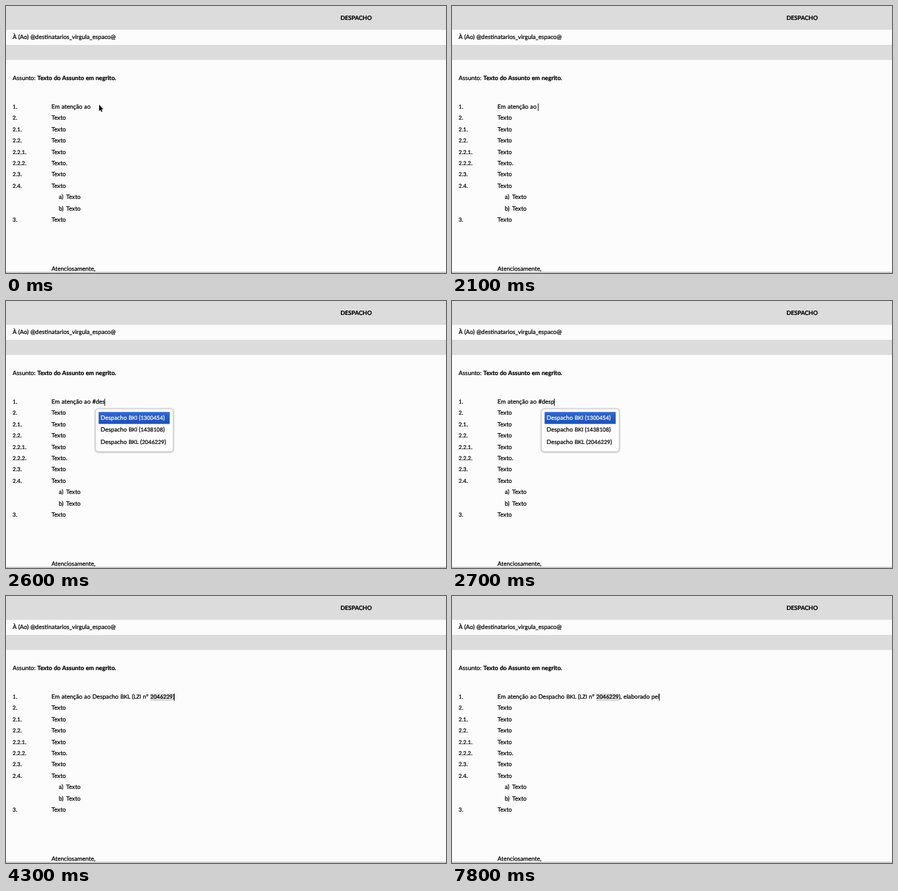
These frames come from a looping animation (600 by 364 pixels, 8000 ms). An HTML page with a canvas:

```html
<!DOCTYPE html>
<html lang="pt-BR">
<head>
<meta charset="utf-8">
<title>Despacho</title>
<style>
html, body { margin: 0; width: 100%; height: 100%; overflow: hidden; background: #fcfcfc; }
canvas { display: block; width: 600px; height: 364px; }
</style>
</head>
<body>
<canvas id="stage"></canvas>
<script>
const W = 600, H = 364, LOOP = 8000;
const canvas = document.getElementById('stage');
const ctx = canvas.getContext('2d');
const dpr = window.devicePixelRatio || 1;
canvas.width = W * dpr;
canvas.height = H * dpr;

const BODY = 8.2, CAPS = 7.55;
const LEFT = 9, INDENT = 62, FIRST = 140, LEADING = 15.4;
const OPENING = 'Em atenção ao';
const NUMBER = '2046229';
const CITED = OPENING + ' Despacho BKL (LZI nº ';

const rows = [
  ['1.', ''], ['2.', 'Texto'], ['2.1.', 'Texto'], ['2.2.', 'Texto'],
  ['2.2.1.', 'Texto'], ['2.2.2.', 'Texto.'], ['2.3.', 'Texto'], ['2.4.', 'Texto'],
  ['a)', 'Texto', 10], ['b)', 'Texto', 10], ['3.', 'Texto']
];

const allItems = [
  'Data de Autuação: 30/10/2018',
  'Tipo: Finalístico: Plano Anual de Fiscalização (PAF) - Orientações e Diretrizes',
  'Especificação: Modelos de Nota Técnica para Metodologia Multicritério 2023',
  'Assunto: 010 - ORGANIZAÇÃO E FUNCIONAMENTO (Normas, Regulamentações, Diretrizes, Procedimentos, Estudos e/ou Decisões...',
  'Assunto: 020.2 - IDENTIFICAÇÃO FUNCIONAL (Inclusive Carteira, Cartão, Crachá, Credencial e Passaporte Diplomático)...',
  'Assunto: 111 - PROJETOS E ANTEPROJETOS DE LEIS',
  'Assunto: 191 - CONSULTAS PARLAMENTARES (Inclusive requerimento de informação)'
];
const dispatches = ['Despacho BKI (1300454)', 'Despacho BKI (1438108)', 'Despacho BKL (2046229)'];

// [time, text after the opening words]
const typed = [
  [0, ''], [1100, ' '], [2200, ' #'], [2300, ' #d'], [2400, ' #de'],
  [2600, ' #des'], [2700, ' #desp'], [2800, ' #despa']
];
// [time, text after the inserted citation]
const tail = [
  [4100, ''], [5000, ','], [5200, ', '], [5400, ', e'], [5600, ', el'], [5800, ', ela'],
  [5900, ', elab'], [6000, ', elabo'], [6100, ', elabora'], [6300, ', elaborad'],
  [6400, ', elaborado'], [6600, ', elaborado '], [7000, ', elaborado p'],
  [7600, ', elaborado pe'], [7800, ', elaborado pel']
];
const caretOn = [
  [0, false], [500, true], [1000, false], [1100, true], [1600, false], [2100, true],
  [3300, false], [3800, true], [4800, false], [5000, true], [7500, false], [7600, true]
];

function at(steps, t) {
  let value = steps[0][1];
  for (const [time, v] of steps) if (t >= time) value = v;
  return value;
}

function setFont(size, bold) {
  ctx.font = `${bold ? 700 : 400} ${size}px Lato, sans-serif`;
}

// A hairline stroke gives the small type its darker colour.
function ink(str, x, y, color) {
  ctx.fillStyle = ctx.strokeStyle = color;
  ctx.lineWidth = 0.22;
  ctx.fillText(str, x, y);
  ctx.strokeText(str, x, y);
}

// Capital runs and digits are set slightly smaller than the rest.
function text(str, x, y, { bold = false, color = '#000' } = {}) {
  for (const run of str.match(/[A-ZÀ-Ý]{2,}|\d+|(?:(?![A-ZÀ-Ý]{2}|\d).)+/g) || []) {
    setFont(/^(\d|[A-ZÀ-Ý]{2})/.test(run) ? CAPS : BODY, bold);
    ink(run, x, y, color);
    x += ctx.measureText(run).width;
  }
  return x;
}

function rect(x, y, w, h, color) {
  ctx.fillStyle = color;
  ctx.fillRect(x, y, w, h);
}

function page() {
  rect(0, 0, W, H, '#fcfcfc');
  rect(0, 0, W, 32.5, '#dcdcdc');
  rect(0, 53, W, 20.5, '#dcdcdc');
  rect(0, 362.6, W, 1, '#a2a2a2');

  setFont(7.95, true);
  ctx.textAlign = 'center';
  ink('DESPACHO', 477.5, 19, '#000');
  ctx.textAlign = 'left';

  text('À (Ao) @destinatarios_virgula_espaco@', LEFT, 45);
  const x = text('Assunto: ', LEFT, 101);
  text('Texto do Assunto em negrito.', x, 101, { bold: true });
  rows.forEach(([label, body, inset], i) => {
    const y = FIRST + i * LEADING;
    text(label, inset ? INDENT + inset : LEFT, y);
    text(body, INDENT + (inset ? 20 : 0), y);
  });
  text('Atenciosamente,', INDENT, 360.5);
}

function firstLine(t) {
  let x;
  if (t < 4100) {
    x = text(OPENING + at(typed, t), INDENT, FIRST);
  } else {
    const start = text(CITED, INDENT, FIRST);
    setFont(CAPS);
    rect(start, 133, ctx.measureText(NUMBER).width, 10, '#dadada');
    x = text(NUMBER, start, FIRST);
    x = text(')' + at(tail, t), x, FIRST);
  }
  if (at(caretOn, t)) rect(x - 0.5, 133, 0.8, 10, '#000');
}

function popup(items, selected, width) {
  const step = 16.5, top = 147;
  ctx.save();
  ctx.beginPath();
  ctx.roundRect(122, top, width, items.length * step + 9, 4);
  ctx.shadowColor = 'rgba(0,0,0,.4)';
  ctx.shadowBlur = 3 * dpr;
  ctx.shadowOffsetY = 0.6 * dpr;
  ctx.fillStyle = '#fff';
  ctx.fill();
  ctx.shadowColor = 'transparent';
  ctx.strokeStyle = '#b8b8b8';
  ctx.lineWidth = 0.6;
  ctx.stroke();
  ctx.restore();

  const y = 151.3 + selected * step;
  const blue = ctx.createLinearGradient(0, y, 0, y + step);
  blue.addColorStop(0, '#3068cc');
  blue.addColorStop(1, '#1c50b4');
  rect(126.3, y, width - 9, step - 0.2, blue);
  items.forEach((item, i) => {
    text(item, 129, 161.8 + i * step, { color: i === selected ? '#fff' : '#000' });
  });
}

function pointer() {
  const pts = [[0, 0], [0, 8.6], [1.9, 6.9], [3.2, 9.9], [4.5, 9.3], [3.2, 6.4], [5.6, 6.2]];
  ctx.beginPath();
  pts.forEach(([x, y]) => ctx.lineTo(127 + x, 134.6 + y));
  ctx.closePath();
  ctx.strokeStyle = '#fff';
  ctx.lineWidth = 1;
  ctx.stroke();
  ctx.fillStyle = '#000';
  ctx.fill();
}

function draw(t) {
  ctx.setTransform(dpr, 0, 0, dpr, 0, 0);
  ctx.lineJoin = 'round';
  ctx.textBaseline = 'alphabetic';
  ctx.fontKerning = 'normal';
  ctx.textRendering = 'geometricPrecision';
  ctx.wordSpacing = '0.3px';
  page();
  firstLine(t);
  if (t >= 2500 && t < 2600) popup(allItems, 0, 500);
  if (t >= 2600 && t < 4100) popup(dispatches, at([[0, 0], [3400, 1], [3900, 2]], t), 106);
  if (t < 1100) pointer();
}

const start = performance.now();
function tick() {
  draw((performance.now() - start) % LOOP);
  requestAnimationFrame(tick);
}
tick();
</script>
</body>
</html>
```
